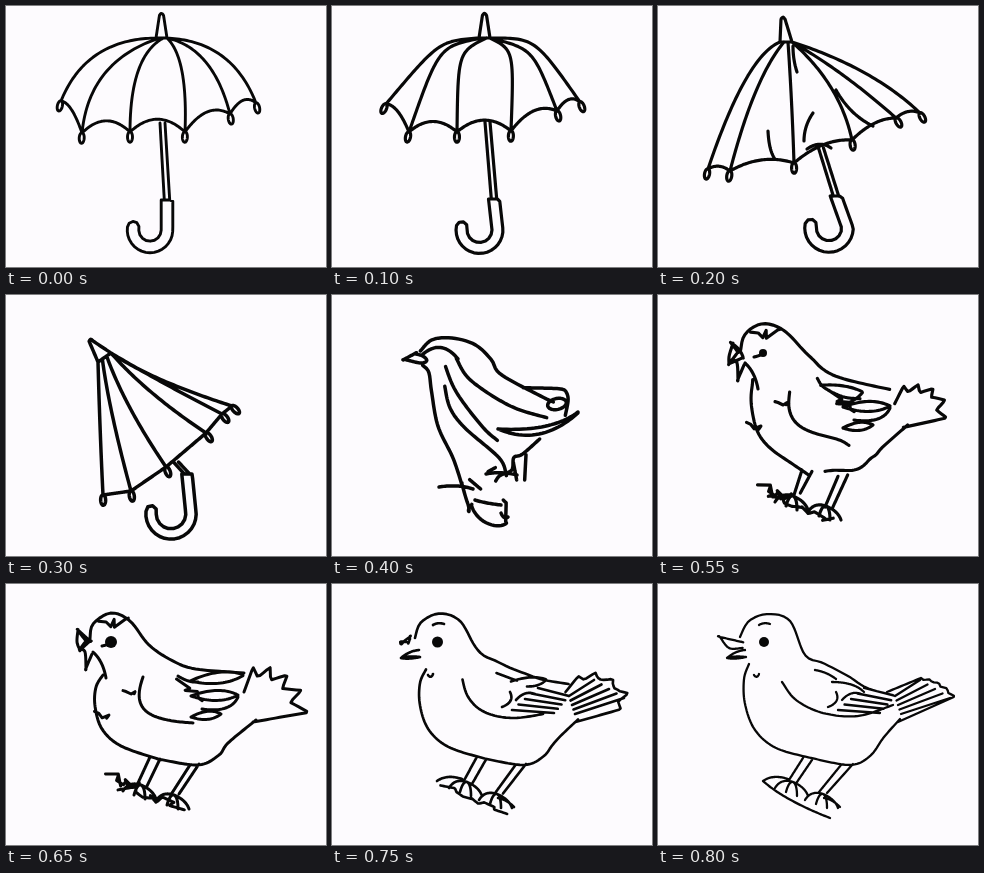
Recreate the animation shown at these times as an HTML page. Size 320x261 px, loop 1000 ms.

```html
<!DOCTYPE html>
<html lang="en">
<head>
<meta charset="utf-8">
<title>Umbrella to bird</title>
<style>
html, body { margin: 0; width: 100%; height: 100%; overflow: hidden; background: #fdfbfe; }
svg { display: block; width: 100%; height: 100%; }
</style>
</head>
<body>
<svg viewBox="0 0 320 261">
  <path id="ink" fill="none" stroke="#080808" stroke-linecap="round" stroke-linejoin="round"/>
  <circle id="eye" fill="#080808"/>
</svg>
<script>
const loopTime = 1000;
const samples = 48;

const lerp = (a, b, k) => a + (b - a) * k;
const mix = (a, b, k) => a.map((v, i) => lerp(v, b[i], k));
const range = (n, f) => Array.from({ length: n }, (_, i) => f(i));
const polar = ([x, y], r, angle) => [x + r * Math.cos(angle), y + r * Math.sin(angle)];
const rad = degrees => degrees * Math.PI / 180;

// Bezier curve whose handles both reach towards the knee; 2/3 gives a plain bend
function bend(a, knee, b, reach = 2 / 3) {
  const c = mix(a, knee, reach), d = mix(b, knee, reach);
  return range(25, i => {
    const t = i / 24, s = 1 - t;
    return [0, 1].map(n => s * s * s * a[n] + 3 * s * s * t * c[n] + 3 * s * t * t * d[n] + t * t * t * b[n]);
  });
}

// Smooth curve through "x,y" points; "!" marks a corner
function through(text) {
  const points = text.split(" ").flatMap(word => {
    const point = word.replace("!", "").split(",").map(Number);
    return word.endsWith("!") ? [point, point] : [point];
  });
  const curve = [points[0]];
  for (let i = 0; i < points.length - 1; i++) {
    const b = points[i], c = points[i + 1];
    const a = points[i - 1] || b, d = points[i + 2] || c;
    for (let s = 1; s <= 8; s++) {
      const t = s / 8;
      curve.push([0, 1].map(n => 0.5 * (2 * b[n] + (c[n] - a[n]) * t
        + (2 * a[n] - 5 * b[n] + 4 * c[n] - d[n]) * t * t
        + (3 * b[n] - a[n] - 3 * c[n] + d[n]) * t * t * t)));
    }
  }
  return curve;
}

function ring([x, y], rx, ry, tilt) {
  return range(25, i => {
    const t = i / 12 * Math.PI, u = rx * Math.sin(t), v = -ry * Math.cos(t);
    return [x + u * Math.cos(tilt) - v * Math.sin(tilt), y + u * Math.sin(tilt) + v * Math.cos(tilt)];
  });
}

// A row of lines that changes evenly from the first to the last
const hatch = (n, first, last) => range(n, i => {
  const [ax, ay, bx, by] = mix(first, last, i / (n - 1));
  return [[ax, ay], [bx, by]];
});

function petal(a, b, size) {
  const [x, y] = mix(a, b, 0.6);
  return [...bend(a, [x, y - size], b), ...bend(b, [x, y + size], a)];
}

// Tail edge: feather tips with notches between them
function fan(root, start, end, n, [angle0, angle1], [r0, r1], notch) {
  const edge = range(2 * n - 1, i => {
    const k = i / (2 * n - 2);
    return polar(root, lerp(r0, r1, k) * (i % 2 ? notch : 1), rad(lerp(angle0, angle1, k)));
  });
  return [start, ...edge, end];
}

function randomFrom(seed) {
  return () => (seed = (seed * 16807) % 2147483647) / 2147483647;
}

function scribble(a, b, n, size, seed) {
  const random = randomFrom(seed);
  return range(n, i => mix(a, b, i / (n - 1)).map(v => v + (random() - 0.5) * size));
}

const foot = ([x, y]) => range(4, i =>
  bend([x, y], [x - 12 + 8 * i, y - 4 + 3 * i], [x - 18 + 11 * i, y + 6 + 4 * i - (i === 3 ? 4 : 0)]));

// Handle: an even band along a straight grip and a half circle
function hook(top, centre, radius, half) {
  const side = offset => [
    [top[0] + offset, top[1]],
    ...range(25, i => polar(centre, radius + offset, rad(i * 7.9)))
  ];
  const inner = side(-half), outer = side(half);
  const tip = polar(centre, radius, rad(189.6));
  const cap = range(9, i => polar(tip, half, rad(189.6 + 180 - i * 22.5 - 180 * 0)));
  return [...inner, ...cap, ...outer.reverse(), inner[0]];
}

// Ribs are [kneeX, kneeY, endX, endY] from left to right
function umbrella({ at, width, reach, lift, finial, ribs, shaft, grip, creases = [] }) {
  const [left, right, top] = finial;
  const knees = ribs.map(r => r.slice(0, 2)), ends = ribs.map(r => r.slice(2));
  const spokes = ends.map((end, i) => bend(mix(left, right, Math.min(1, i / 3)), knees[i], end, reach));
  const hem = range(5, i => {
    const [a, b] = [ends[i], ends[i + 1]];
    const [x, y] = mix(a, b, 0.5);
    return bend(a, [x, y - lift * (8 + 0.32 * (b[0] - a[0]))], b);
  });
  const loops = ends.map((end, i) => {
    const tilt = 0.6 * Math.atan2(knees[i][0] - end[0], end[1] - knees[i][1]);
    return ring(polar(end, 5, tilt + Math.PI / 2), 2.5, 5.3, tilt);
  });
  const spike = [left, [top[0] - 2, top[1] + 2], top, [top[0] + 2, top[1] + 2], right, left];
  const rod = hatch(2, [shaft[0] - 2.5, shaft[1], grip.top[0] - 2.7, grip.top[1]],
    [shaft[0] + 2.5, shaft[1], grip.top[0] + 2.7, grip.top[1]]);
  const handle = hook(grip.top, grip.centre, grip.radius, grip.half);
  return {
    at, width, extra: creases,
    main: [spike, spokes[0], spokes[5], handle, ...spokes.slice(1, 5), ...hem, ...loops, ...rod]
  };
}

const openUmbrella = umbrella({
  at: 0, width: 2.9, reach: 2 / 3, lift: 1,
  finial: [[150, 32], [161, 32], [155.5, 7]],
  ribs: [[80, 33, 55, 95], [83, 55, 76, 127], [124, 50, 124, 126],
    [182, 52, 179, 126], [207, 42, 224, 108], [226, 35, 250, 97]],
  shaft: [156.5, 117],
  grip: { top: [161, 194], centre: [144, 224], radius: 17, half: 5.8 }
});

const bentUmbrella = umbrella({
  at: 2, width: 3.2, reach: 1, lift: 0.9,
  finial: [[147, 32], [158, 32], [152.5, 7]],
  ribs: [[107, 35, 54, 98], [107, 40, 77, 126], [126, 46, 125, 126],
    [182, 44, 179, 125], [201, 43, 225, 105], [203, 32, 248, 96]],
  shaft: [155.5, 116],
  grip: { top: [162, 193], centre: [147.5, 224], radius: 18, half: 5.5 }
});

const tiltedUmbrella = umbrella({
  at: 4, width: 3.2, reach: 2 / 3, lift: 0.5,
  finial: [[122, 36], [134, 36], [125, 11]],
  ribs: [[88, 50, 50, 163], [96, 72, 72, 165], [134, 95, 136, 157],
    [182, 78, 194, 134], [185, 65, 238, 112], [215, 62, 262, 107]],
  shaft: [163, 142],
  grip: { top: [178, 190], centre: [171, 222], radius: 18.5, half: 5.8 },
  creases: [
    bend([110, 125], [111, 145], [117, 153]), bend([146, 135], [146, 120], [155, 107]),
    bend([178, 84], [192, 109], [215, 120]), bend([135, 40], [135, 54], [139, 66]),
    bend([149, 143], [162, 134], [173, 142])
  ]
});

const foldedUmbrella = umbrella({
  at: 6, width: 3.5, reach: 2 / 3, lift: 0,
  finial: [[92, 67], [105, 58], [85, 44]],
  ribs: [[94, 140, 97, 200], [103, 115, 125, 196], [118, 110, 160, 172],
    [140, 98, 200, 138], [150, 85, 216, 119], [145, 85, 226, 111]],
  shaft: [170, 167],
  grip: { top: [181, 179], centre: [165, 219], radius: 20, half: 5.2 }
});

// Main strokes: beak, front, back, branch, wing, feather, shoulder, tail, rump, legs
const roughBird = {
  at: 9, width: 3.5,
  main: [
    through("80,55! 66,74! 85,75 90,68 87,60 80,55"),
    through("90,72 99,77 103,97 112,131 134,161 148,190"),
    through("80,55 90,34 113,27 139,33 155,52 162,71 204,97 219,105"),
    through("107,192! 117,207 135,208 152,220 166,234! 169,218"),
    through("121,105 127,125 146,140 191,157 199,173"),
    through("120,77 129,98 154,124 168,132"),
    through("134,66 145,88 185,110 222,115"),
    through("234,110 265,98 270,102 264,110 242,121"),
    through("197,179 202,171 217,163 217,145 228,140 249,118"),
    ...hatch(2, [144, 179, 143, 205], [154, 179, 145, 190]),
    ...hatch(2, [172, 182, 169, 218], [183, 180, 176, 222])
  ],
  extra: [
    bend([166, 134], [208, 152], [246, 118]), bend([166, 134], [220, 137], [246, 117]),
    ring([225, 109], 9.5, 5.5, rad(-12)), bend([90, 60], [109, 43], [126, 64]),
    bend([107, 192], [126, 189], [141, 194]), bend([143, 205], [152, 208], [169, 210]),
    bend([154, 179], [168, 176], [185, 180]), bend([169, 218], [172, 225], [176, 222])
  ]
};

const sketchBird = {
  at: 12, width: 3, eye: [105, 58, 6],
  main: [
    through("72,46! 71,58 74,66! 84,57! 72,46!"),
    through("97,91 90,103 89,122 96,145 115,162 152,175"),
    through("84,55 87,40 105,29 124,37 143,61 167,77 190,85 238,89"),
    scribble([118, 204], [173, 224], 12, 12, 5),
    bend([137, 93], [122, 135], [187, 139], 0.75),
    petal([184, 97], [238, 91], 11),
    bend([172, 92], [183, 99], [192, 98]),
    fan([243, 122], [238, 108], [247, 138], 5, [-84, 6], [39, 60], 0.72),
    through("152,175 192,181 213,171 222,159 250,136"),
    ...hatch(2, [144, 173, 132, 199], [154, 175, 141, 202]),
    ...hatch(2, [184, 181, 166, 209], [193, 180, 173, 210])
  ],
  extra: [
    petal([185, 112], [232, 111], 10), petal([185, 133], [215, 130], 8),
    bend([232, 113], [225, 129], [196, 125]),
    through("73,48! 80,57! 74,65! 79,68 80,84! 86,70"),
    bend([87, 68], [97, 77], [100, 94]), bend([96, 62], [101, 61], [104, 59]),
    scribble([97, 41], [120, 38], 7, 9, 31),
    scribble([121, 106], [131, 112], 5, 8, 12), scribble([92, 129], [103, 135], 5, 7, 40),
    scribble([106, 194], [130, 203], 11, 13, 9),
    scribble([176, 98], [196, 113], 6, 11, 17),
    ...foot([135, 201]), ...foot([168, 211])
  ]
};

const fineBird = {
  at: 14, width: 2.3, eye: [106, 58, 5],
  main: [
    through("84,58! 62,53! 71,64 84,64!"),
    through("91,80 86,95 87,120 97,146 118,164 153,174"),
    through("82,53 91,37 110,30 132,37 147,71 165,79 190,92 209,104 235,111"),
    bend([105, 197], [126, 216], [172, 234]),
    through("124,98 138,116 165,129 200,132 235,121"),
    bend([174, 98], [196, 98], [206, 108]),
    bend([157, 86], [169, 88], [178, 95]),
    fan([236, 122], [229, 108], [240, 138], 5, [-46, -9], [39, 62], 0.94),
    through("153,174 192,181 212,172 226,153 242,135"),
    ...hatch(2, [145, 174, 131, 196], [154, 176, 139, 198]),
    ...hatch(2, [183, 181, 161, 208], [195, 180, 169, 209])
  ],
  extra: [
    ...hatch(5, [206, 104, 237, 112], [180, 126, 222, 129]),
    ...hatch(5, [237, 112, 262, 96], [243, 130, 292, 114]),
    petal([88, 73], [69, 74], 2), bend([69, 74], [77, 67], [87, 66]),
    bend([170, 123], [183, 118], [178, 108]), bend([184, 116], [193, 106], [203, 110]),
    bend([101, 41], [106, 38], [112, 40]), bend([96, 91], [99, 95], [101, 90]),
    bend([105, 197], [115, 190], [130, 195]), bend([166, 214], [174, 215], [182, 223]),
    ...foot([135, 198]), ...foot([165, 210])
  ]
};

const poses = [openUmbrella, bentUmbrella, tiltedUmbrella, foldedUmbrella, roughBird, sketchBird, fineBird];

// Evenly spaced points, so that any two strokes can be blended
function resample(curve) {
  const lengths = [0];
  for (let i = 1; i < curve.length; i++) {
    lengths.push(lengths[i - 1] + Math.hypot(curve[i][0] - curve[i - 1][0], curve[i][1] - curve[i - 1][1]));
  }
  const total = lengths[lengths.length - 1];
  let i = 1;
  return range(samples, n => {
    const goal = total * n / (samples - 1);
    while (i < curve.length - 1 && lengths[i] < goal) i++;
    const span = lengths[i] - lengths[i - 1] || 1;
    return mix(curve[i - 1], curve[i], Math.min(1, (goal - lengths[i - 1]) / span));
  });
}

for (const pose of poses) pose.main = pose.main.map(resample);

const toPath = points => "M" + points.map(p => p[0].toFixed(2) + " " + p[1].toFixed(2)).join("L");

function blend(from, to, k) {
  const near = k < 0.5 ? from : to;
  const strokes = near.main.map((stroke, i) => {
    const a = from.main[i], b = to.main[i];
    return a && b ? a.map((p, n) => mix(p, b[n], k)) : stroke;
  });
  return [...strokes, ...near.extra].map(toPath).join("");
}

// Steps of 50 ms, with longer holds near the end
function stepAt(time) {
  if (time >= 800) return 14;
  if (time >= 750) return 13;
  if (time >= 650) return 12;
  return Math.min(11, Math.floor(time / 50));
}

const ink = document.getElementById("ink");
const eye = document.getElementById("eye");

function draw(time) {
  const step = stepAt(time);
  const next = Math.max(1, poses.findIndex(pose => pose.at >= step));
  const from = poses[next - 1], to = poses[next];
  const k = (step - from.at) / (to.at - from.at);
  ink.setAttribute("d", blend(from, to, k));
  ink.setAttribute("stroke-width", lerp(from.width, to.width, k));
  const end = to.eye || [0, 0, 0];
  const start = from.eye || [end[0], end[1], 0];
  ["cx", "cy", "r"].forEach((name, i) => eye.setAttribute(name, lerp(start[i], end[i], k)));
}

const begin = performance.now();
function tick() {
  draw((performance.now() - begin) % loopTime);
  requestAnimationFrame(tick);
}
tick();
</script>
</body>
</html>
```
